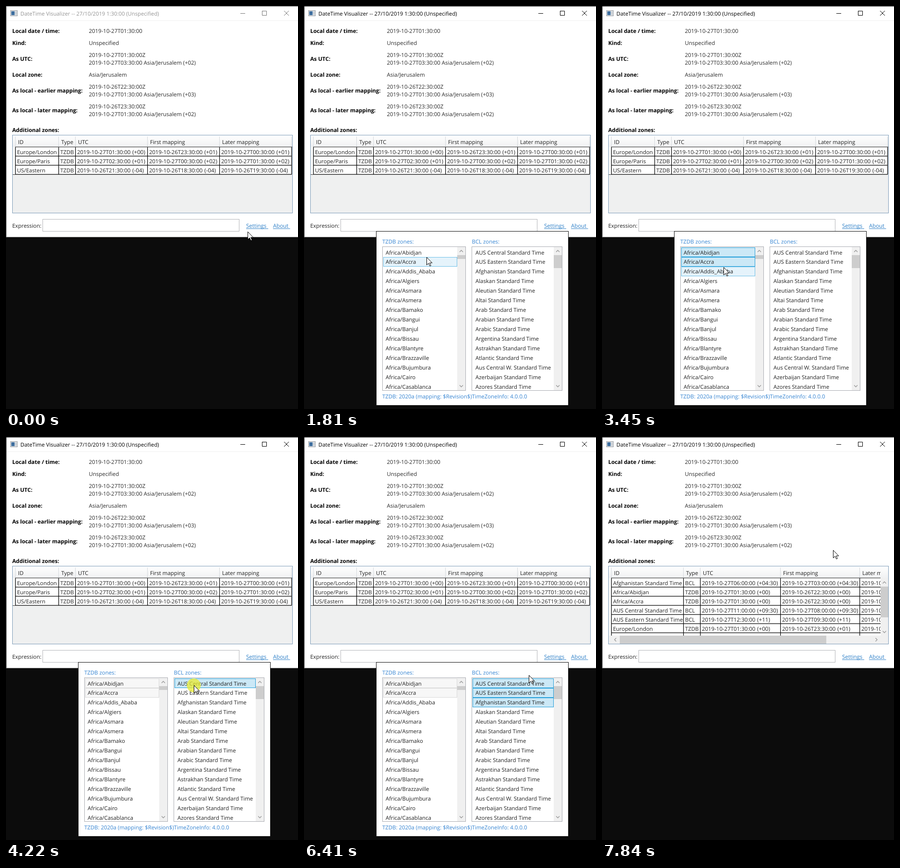
Write an HTML page with a canvas that moves like this. It is 608 px wide and 838 px high and loops after 8310 ms.

```html
<!DOCTYPE html>
<html lang="en">
<head>
<meta charset="utf-8">
<title>DateTime Visualizer</title>
<style>
html, body { margin: 0; width: 100%; height: 100%; overflow: hidden; background: #0c0c0c; }
canvas { display: block; width: 608px; height: 838px; }
</style>
</head>
<body>
<canvas id="stage"></canvas>
<script>
const LOOP = 8310, TICK = 78.2;
const FONT = '"Open Sans", "Noto Sans", sans-serif';
const canvas = document.getElementById('stage');
const ctx = canvas.getContext('2d');
const scale = window.devicePixelRatio || 1;
canvas.width = 608 * scale;
canvas.height = 838 * scale;

// Cursor path: [tick, x, y], linear in between
const path = [
  [0, 503, 469], [2, 518, 466], [3, 518, 466], [5, 522, 458], [17, 522, 458],
  [18, 495, 464], [20, 380, 492], [22, 270, 518], [23, 255, 522], [24, 255, 522],
  [25, 254, 519], [28, 253, 511], [33, 253, 511], [36, 255, 523], [41, 255, 523],
  [44, 253, 543], [46, 262, 553], [48, 325, 540], [50, 380, 519], [51, 391, 516],
  [55, 391, 516], [58, 389, 532], [62, 389, 532], [66, 383, 550], [71, 383, 550],
  [72, 385, 549], [73, 385, 549], [78, 400, 595], [80, 432, 560], [82, 468, 495],
  [84, 485, 461], [88, 471, 386], [92, 471, 386], [95, 481, 235], [107, 481, 235]
];
const clicks = [[8, 10], [32, 34], [40, 42], [54, 56], [61, 63], [69, 70], [98, 100]];
const OPEN = 10, CLOSE = 98, REFRESH = 99, FOCUS = 8, LINK_HOVER = 4;

const tzdb = {
  x: 163, width: 174, textX: 170, thumb: 8, selectedAt: [32, 40], blurAt: 54,
  items: ['Abidjan', 'Accra', 'Addis_Ababa', 'Algiers', 'Asmara', 'Asmera', 'Bamako', 'Bangui',
    'Banjul', 'Bissau', 'Blantyre', 'Brazzaville', 'Bujumbura', 'Cairo', 'Casablanca'].map(s => 'Africa/' + s)
};
const bcl = {
  x: 349, width: 189, textX: 357, thumb: 27, selectedAt: [54, 61, 69], blurAt: Infinity,
  items: ['AUS Central', 'AUS Eastern', 'Afghanistan', 'Alaskan', 'Aleutian', 'Altai', 'Arab', 'Arabian',
    'Arabic', 'Argentina', 'Astrakhan', 'Atlantic', 'Aus Central W.', 'Azerbaijan', 'Azores'].map(s => s + ' Standard Time')
};

const headers = ['ID', 'Type', 'UTC', 'First mapping', 'Later mapping'];
const before = {
  columns: [20, 110, 145, 295, 445, 595], right: 596, bottom: 430,
  rows: [
    ['Europe/London', 'TZDB', '27T01:30:00 (+00)', '26T23:30:00 (+01)', '27T00:30:00 (+01)'],
    ['Europe/Paris', 'TZDB', '27T02:30:00 (+01)', '27T00:30:00 (+02)', '27T01:30:00 (+02)'],
    ['US/Eastern', 'TZDB', '26T21:30:00 (-04)', '26T18:30:00 (-04)', '26T19:30:00 (-04)']
  ]
};
const after = {
  columns: [20, 170, 205, 372, 537, 704], right: 580, bottom: 413, scrolls: true,
  rows: [
    ['Afghanistan Standard Time', 'BCL', '27T06:00:00 (+04:30)', '27T03:00:00 (+04:30)'],
    ['Africa/Abidjan', 'TZDB', '27T01:30:00 (+00)', '26T22:30:00 (+00)'],
    ['Africa/Accra', 'TZDB', '27T01:30:00 (+00)', '26T22:30:00 (+00)'],
    ['AUS Central Standard Time', 'BCL', '27T11:00:00 (+09:30)', '27T08:00:00 (+09:30)'],
    ['AUS Eastern Standard Time', 'BCL', '27T12:30:00 (+11)', '27T09:30:00 (+11)'],
    ['Europe/London', 'TZDB', '27T01:30:00 (+00)', '26T23:30:00 (+01)'],
    []
  ].map(row => row.length ? [...row, row[3]] : row)
};

function text(s, x, y, color = '#222', size = 11.4, weight = 400) {
  ctx.font = `${weight} ${size}px ${FONT}`;
  ctx.fillStyle = color;
  ctx.fillText(s, x, y);
}

function rect(x, y, w, h, fill, border) {
  ctx.fillStyle = fill;
  ctx.fillRect(x, y, w, h);
  if (border) {
    ctx.strokeStyle = border;
    ctx.lineWidth = 1;
    ctx.strokeRect(x + .5, y + .5, w - 1, h - 1);
  }
}

function lines(color, width, ...strokes) {
  ctx.strokeStyle = color;
  ctx.lineWidth = width;
  ctx.beginPath();
  for (const points of strokes) points.forEach(([x, y], i) => i ? ctx.lineTo(x, y) : ctx.moveTo(x, y));
  ctx.stroke();
}

// (dx, dy) is the direction the arrow points to
function chevron(x, y, dx, dy) {
  lines('#999', 1.3, [
    [x - dx * 1.5 - dy * 3.5, y - dy * 1.5 - dx * 3.5],
    [x + dx * 2, y + dy * 2],
    [x - dx * 1.5 + dy * 3.5, y - dy * 1.5 + dx * 3.5]
  ]);
}

function clipped(x, y, w, h, draw) {
  ctx.save();
  ctx.beginPath();
  ctx.rect(x, y, w, h);
  ctx.clip();
  draw();
  ctx.restore();
}

function drawTitleBar(active) {
  rect(0, 0, 608, 480.5, '#fff');
  rect(0, 0, 608, 1, active ? '#1c1c1c' : '#555');
  rect(0, 0, 1, 480.5, active ? '#1c1c1c' : '#555');
  rect(1, 30, 607, 1, '#f0f0f0');
  rect(9, 9, 15, 12, '#f4f4f4', '#8a9097');
  rect(11, 11, 7, 8, '#3f6f9f');
  rect(19, 11, 3, 8, '#c3cbd2');
  text('DateTime Visualizer -- 27/10/2019 1:30:00 (Unspecified)', 30, 20, active ? '#000' : '#949494', 11.25);
  const ink = active ? '#000' : '#777';
  lines(ink, 1,
    [[488, 15.5], [498, 15.5]],
    [[533.5, 10.5], [542.5, 10.5], [542.5, 19.5], [533.5, 19.5], [533.5, 10]],
    [[579, 10], [589, 20]], [[589, 10], [579, 20]]);
}

function drawDetails() {
  const fields = [
    ['Local date / time:', 56, '2019-10-27T01:30:00'],
    ['Kind:', 81, 'Unspecified'],
    ['As UTC:', 114, '2019-10-27T01:30:00Z', '2019-10-27T03:30:00 Asia/Jerusalem (+02)'],
    ['Local zone:', 147, 'Asia/Jerusalem'],
    ['As local - earlier mapping:', 180, '2019-10-26T22:30:00Z', '2019-10-27T01:30:00 Asia/Jerusalem (+03)'],
    ['As local - later mapping:', 221, '2019-10-26T23:30:00Z', '2019-10-27T01:30:00 Asia/Jerusalem (+02)'],
    ['Additional zones:', 262]
  ];
  for (const [label, y, ...values] of fields) {
    text(label, 13, y, '#000', 11.4, 700);
    values.forEach((value, i) => text(value, 172.5, y + (values.length > 1 ? i * 16 - 8 : 0), '#2b2b2b', 11.45));
  }
}

function drawGrid({ columns, rows, right, bottom, scrolls }) {
  rect(13, 268, 584, 163, '#eff0f0', '#7f9db9');
  const shade = ctx.createLinearGradient(0, 269, 0, 293);
  shade.addColorStop(0, '#fff');
  shade.addColorStop(1, '#f0f1f2');
  rect(14, 269, 582, 24, shade);
  clipped(14, 269, right - 14, bottom - 269, () => {
    const end = 293 + rows.length * 19;
    rect(14, 293, columns[5] - 14, end - 293, '#fff');
    columns.forEach((x, i) => {
      rect(x - 1, 271, 1, 22, '#d5d9dd');
      if (i < 5) text(headers[i], x + 5, 287);
    });
    rows.forEach((row, r) => row.forEach((cell, c) => {
      const x = columns[c] + 3, y = 308 + r * 19;
      if (c < 2) return text(cell, x, y);
      const [time, offset] = cell.split(' ');
      text('2019-10-' + time, x, y, '#222', 11.45);
      text(offset, x + 115, y, '#222', 11.7);
    }));
    for (const x of columns) rect(x - 1, 293, 1.3, end - 293, '#111');
    for (let y = 293; y <= end; y += 19) rect(y === 293 ? 19 : 14, y - .5, columns[5] - 14, 1.3, y === 293 ? '#555' : '#111');
    rect(14, 293, 5, end - 293, '#f7f8f8');
  });
  if (!scrolls) return;
  rect(580, 294, 16, 119, '#f0f0f0');
  rect(580, 311, 16, 64, '#cdcdcd');
  chevron(588, 303, 0, -1);
  chevron(588, 405, 0, 1);
  rect(20, 413, 576, 17, '#f0f0f0');
  rect(37, 413, 430, 17, '#cdcdcd');
  chevron(28, 421.5, -1, 0);
  chevron(571, 421.5, 1, 0);
}

function drawFooter(hover) {
  text('Expression:', 13, 461);
  rect(76, 443, 410, 26, '#fff', '#b4b6ba');
  const link = (s, x, width, color) => {
    text(s, x, 461, color);
    rect(x, 462.5, width, 1, color);
  };
  link('Settings', 500, 46, hover ? '#f00' : '#2f80c8');
  link('About', 556, 35.5, '#2f80c8');
}

function drawList(list, tick, cursor) {
  const { x, width, textX, thumb, selectedAt, blurAt, items } = list;
  const bar = x + width - 18, rowWidth = bar - x - 2;
  rect(x, 500, width, 300, '#fff', '#abadb3');
  const inside = cursor.x >= x + 2 && cursor.x < bar && cursor.y >= 502 && cursor.y < 799;
  const hovered = inside ? Math.floor((cursor.y - 502) / 20) : -1;
  clipped(x + 1, 501, width - 2, 298, () => items.forEach((item, i) => {
    const y = 502 + i * 19.96;
    const top = Math.round(y);
    if (tick >= selectedAt[i]) {
      const focused = tick < blurAt;
      rect(x + 2, top, rowWidth, 20, focused ? '#cbe8f6' : '#f7f7f7', focused ? '#26a0da' : '#dadada');
    } else if (i === hovered) {
      rect(x + 2, top, rowWidth, 20, '#e5f3fb', '#70c0e7');
    }
    text(item, textX, y + 14.5);
  }));
  rect(bar, 501, 17, 298, '#f0f0f0');
  rect(bar, 518, 17, thumb, '#cdcdcd');
  chevron(bar + 8.5, 510, 0, -1);
  chevron(bar + 8.5, 790, 0, 1);
}

function drawPopup(tick, cursor) {
  const blue = '#3584d2';
  rect(150, 468, 401, 363, '#fff', '#111');
  text('TZDB zones:', 163, 493.5, blue);
  text('BCL zones:', 349.5, 493.5, blue);
  drawList(tzdb, tick, cursor);
  drawList(bcl, tick, cursor);
  text('TZDB: 2020a (mapping: $Revision$)', 163, 816, blue);
  text('TimeZoneInfo: 4.0.0.0', 349.5, 816, blue);
}

const arrow = new Path2D('M.5 .5V16.5L4.2 13L7 18.7L9.3 17.7L6.6 12.2H11.8Z');
const hand = new Path2D('M-2 1Q0-1 2 1V7L10 9V16L8 21H-2L-7 13Q-6 10-2 13Z');

function drawCursor({ x, y }, shape, clicking) {
  if (clicking) {
    ctx.fillStyle = 'rgba(232,235,50,.75)';
    ctx.beginPath();
    ctx.arc(x, y + .5, 14.5, 0, Math.PI * 2);
    ctx.fill();
  }
  ctx.save();
  ctx.translate(x, y);
  ctx.fillStyle = '#fff';
  ctx.fill(shape);
  ctx.strokeStyle = '#000';
  ctx.lineWidth = 1;
  ctx.stroke(shape);
  ctx.restore();
}

function cursorAt(tick) {
  const next = path.findIndex(([t]) => t > tick);
  const [t0, x0, y0] = path[next - 1], [t1, x1, y1] = path[next];
  const k = (tick - t0) / (t1 - t0);
  return { x: Math.round(x0 + (x1 - x0) * k), y: Math.round(y0 + (y1 - y0) * k) };
}

function render(now) {
  const tick = Math.floor((now % LOOP + 12) / TICK);
  const cursor = cursorAt(tick);
  const onLink = tick >= LINK_HOVER && tick < OPEN;
  ctx.setTransform(scale, 0, 0, scale, 0, 0);
  ctx.textRendering = 'geometricPrecision';
  rect(0, 0, 608, 838, '#0c0c0c');
  drawTitleBar(tick >= FOCUS);
  drawDetails();
  drawGrid(tick >= REFRESH ? after : before);
  drawFooter(onLink);
  if (tick >= OPEN && tick < CLOSE) drawPopup(tick, cursor);
  drawCursor(cursor, onLink ? hand : arrow, clicks.some(([from, to]) => tick >= from && tick < to));
}

const start = performance.now();
function loop() {
  render(performance.now() - start);
  requestAnimationFrame(loop);
}
loop();
</script>
</body>
</html>
```
